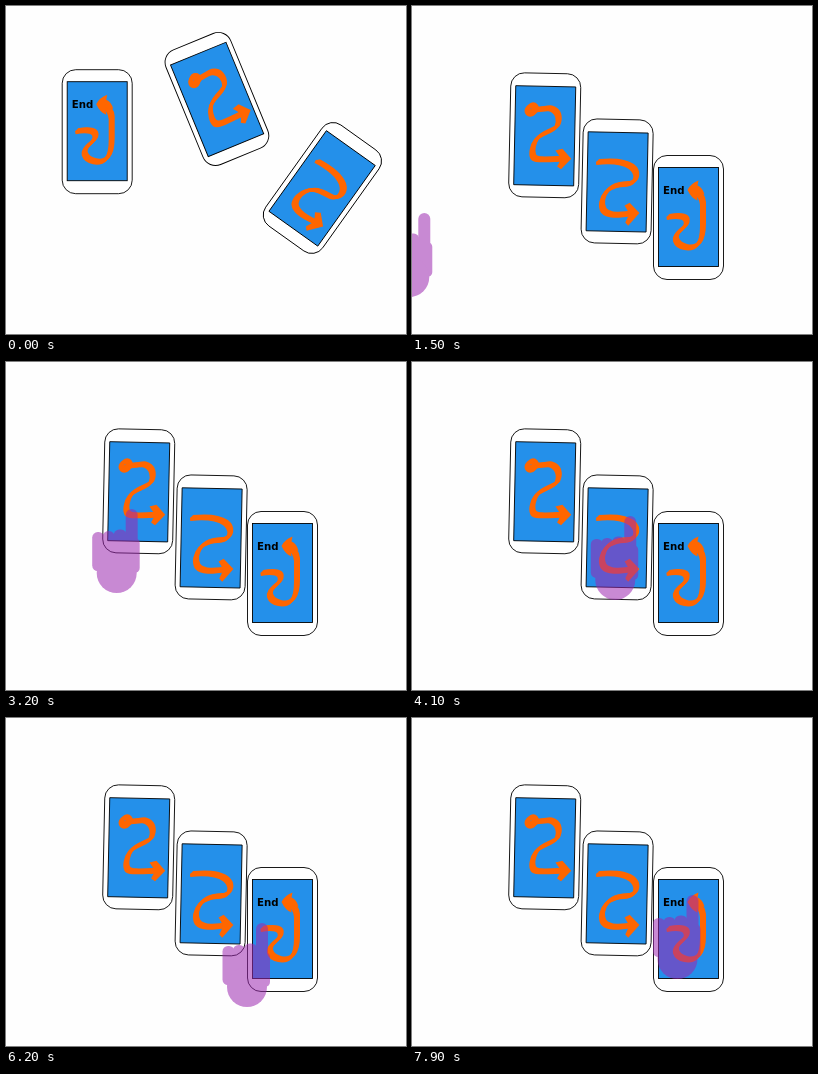
An HTML page for the animation above (8 s loop, 400 by 328 pixels).

```html
<!DOCTYPE html>
<html>
<head>
<meta charset="utf-8">
<style>
  html, body { margin: 0; width: 100%; height: 100%; overflow: hidden; background: #fefefe; }
  svg { display: block; width: 400px; height: 328px; }
  .ink { fill: none; stroke: #f60; stroke-width: 3.2; }
  .head { fill: #f60; }
  text { font: bold 10.2px "DejaVu Sans", sans-serif; }
</style>
</head>
<body>
<svg viewBox="0 0 400 328">
  <defs>
    <g id="case" stroke="#000" stroke-width=".9">
      <rect x="-35" y="-61" width="70" height="124" rx="13.5" fill="#fff"/>
      <rect x="-30" y="-49" width="60" height="99" fill="#2490ea"/>
    </g>
  </defs>
  <g id="first">
    <use href="#case" transform="scale(1 -1)"/>
    <circle class="ink" cx="-13.5" cy="-26.5" r="4.2"/>
    <path class="ink" d="M-13.5-26.5C-5-26 0-28.5 5-28C14-26 15-17 12.5-11C10-6-3-4-8 3C-12 8-13 17-11 20.5C-9 24-3 23.5 20 22"/>
    <path class="head" d="M11 14L18 12L27 22L17 32.5L13 30L17 22Z"/>
  </g>
  <g id="second">
    <use href="#case" transform="scale(1 -1)"/>
    <path class="ink" d="M-20-20C-8-21.5 6-21.5 14-16C22-10 20-1 12 1C3 2-5 3-10 9C-15 15-16 23-13 28C-8 34 3 33 18 30"/>
    <path class="head" d="M8 23L13 20L23 30L12 43L9 40L13 31Z"/>
  </g>
  <g id="last">
    <use href="#case"/>
    <text x="-25.5" y="-22.7">End</text>
    <path class="ink" d="M-20.5 .5C-8-2 0 0-2 7C-4 13-14 15-12.5 23C-10 31 4 34 10 27Q14.5 22 14.5 8V-13Q14-22 4-27.5"/>
    <path class="head" d="M-1-26.5Q2-33 10-36L9-31Q14-29 16-22L8-23L9-16Q3-18-1-26.5Z"/>
  </g>
  <g id="hand" fill="#9c27b0" opacity=".54">
    <rect x="-6" y="-6" width="12" height="50" rx="6"/>
    <rect x="-39.5" y="17" width="12" height="39" rx="5.5"/>
    <rect x="-29" y="16" width="12" height="40" rx="5.5"/>
    <rect x="-18" y="14.5" width="13" height="40" rx="5.5"/>
    <rect x="-36" y="23" width="44" height="35" rx="5"/>
    <circle cx="-15" cy="58" r="20"/>
  </g>
</svg>
<script>
const LOOP = 8000, STEP = 100;
const byId = id => document.getElementById(id);

// Each phone drifts from its first pose to the second, then glides to the third: [x, y, angle]
const poses = {
  first: [[211.3, 93.9, -22.4], [213.3, 95.7, -22.4], [132.7, 130.3, 1.2]],
  second: [[315.8, 182.8, 35.5], [297.5, 181.8, 29.8], [205.1, 176.4, 1.2]],
  last: [[91.2, 124.7, 0], [91.2, 124.7, 0], [276.5, 210.5, 0]]
};
const times = [0, 600, 1100];

const matrix = ([x, y, angle]) => new DOMMatrix().translate(x, y).rotate(angle);

// Stage point at a fraction of the stroke on a phone at rest
function onStroke(id, fraction) {
  const stroke = byId(id).querySelector("path.ink");
  const point = stroke.getPointAtLength(stroke.getTotalLength() * fraction);
  return matrix(poses[id][2]).transformPoint(point);
}

// The finger traces the three strokes, hopping straight from phone to phone
const stops = [
  [2000, "first", 0], [3200, "first", .77], [3550, "first", 1],
  [3750, "second", 0], [4100, "second", .25], [5000, "second", .49], [5750, "second", 1],
  [6200, "last", 0], [7900, "last", 1]
];
const entry = [1400, -9.2, 235];
const handKeys = [entry, ...stops.map(([time, id, fraction]) => {
  const { x, y } = onStroke(id, fraction);
  return [time, x, y];
})];

function valueAt(keys, t) {
  const next = keys.findIndex(key => key[0] > t);
  if (next < 1) return keys.at(next).slice(1);
  const a = keys[next - 1], b = keys[next];
  const k = (t - a[0]) / (b[0] - a[0]);
  return a.slice(1).map((v, i) => v + (b[i + 1] - v) * k);
}

const tracks = { hand: handKeys };
for (const id in poses) tracks[id] = poses[id].map((pose, i) => [times[i], ...pose]);

// A slanted nib: repeat each stroke along a short diagonal
for (const ink of document.querySelectorAll(".ink")) {
  for (const shift of [-1.4, -.7, .7, 1.4]) {
    const copy = ink.cloneNode();
    copy.setAttribute("transform", `translate(${shift} ${-shift})`);
    ink.after(copy);
  }
}

function draw(now) {
  const t = Math.floor(now % LOOP / STEP) * STEP;
  for (const id in tracks) {
    const [x, y, angle = 0] = valueAt(tracks[id], t);
    byId(id).setAttribute("transform", matrix([x, y, angle]));
  }
}

const start = performance.now();
function tick() {
  draw(performance.now() - start);
  requestAnimationFrame(tick);
}
tick();
</script>
</body>
</html>
```
